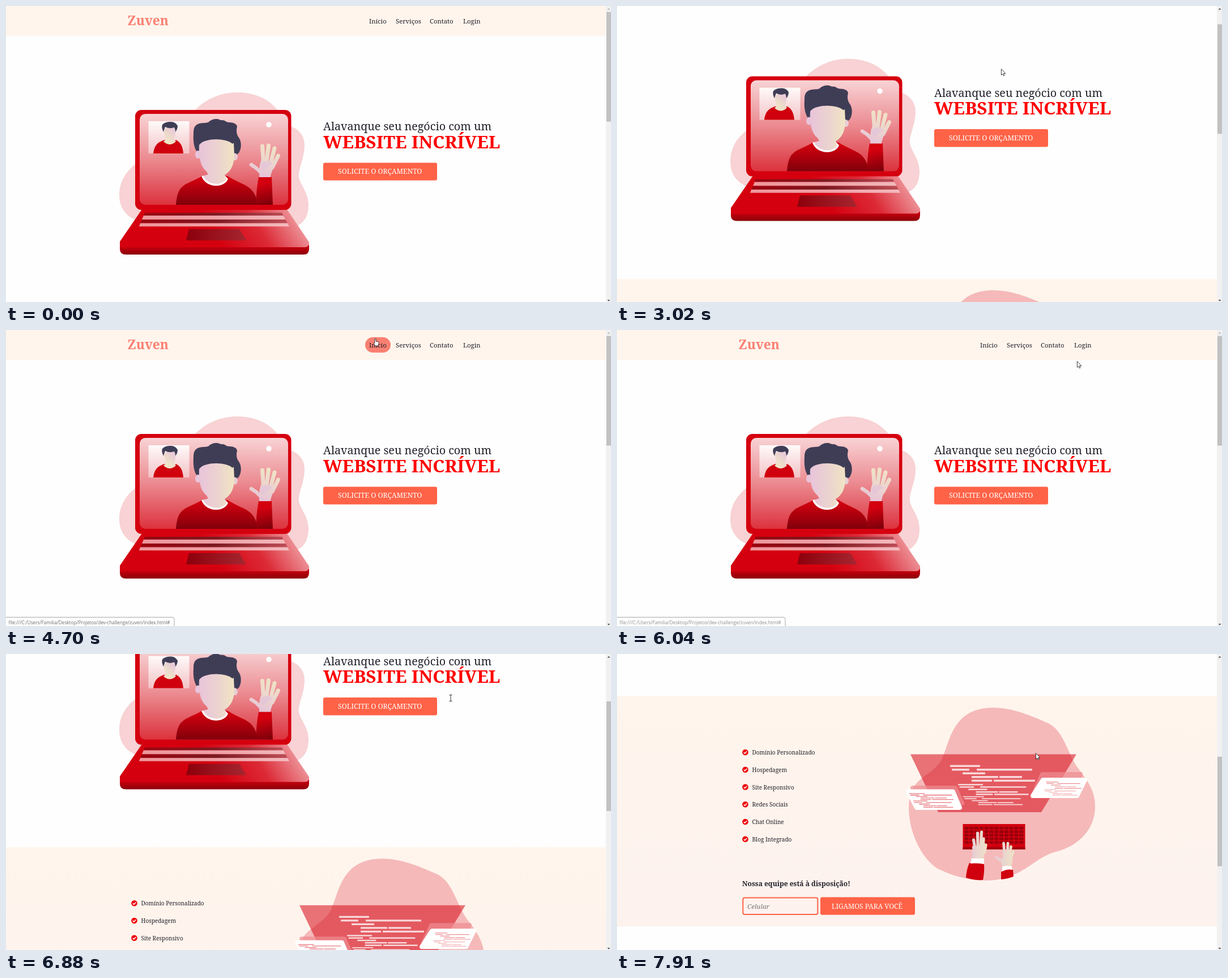
These frames come from a looping animation (1068x524 px, 8000 ms). An HTML page:

```html
<!DOCTYPE html>
<html lang="pt-BR">
<head>
<meta charset="utf-8">
<title>Landing page</title>
<style>
html, body { margin: 0; width: 100%; height: 100%; overflow: hidden; background: #fefefe; }
svg { display: block; width: 100%; height: 100%; }
text { font-family: "Noto Serif", serif; fill: #20202a; white-space: pre; }
.b { font-weight: 700; }
.w { fill: #fff; }
#status text { font-family: "Open Sans", sans-serif; }
</style>
</head>
<body>
<svg id="stage" viewBox="0 0 1068 524" xmlns="http://www.w3.org/2000/svg"></svg>
<script>
const LOOP = 8000, STEP = 50;
const stage = document.getElementById('stage');
const $ = id => document.getElementById(id);

// ---- drawing helpers ----
const path = (d, fill, more = '') => `<path d="${d}" fill="${fill}" ${more}/>`;
const rect = (x, y, w, h, fill, rx = 0, more = '') =>
  `<rect x="${x}" y="${y}" width="${w}" height="${h}" fill="${fill}" rx="${rx}" ${more}/>`;
const text = (x, y, size, str, more = '') =>
  `<text x="${x}" y="${y}" font-size="${size}" ${more}>${str}</text>`;
const grad = (id, x1, y1, x2, y2, ...stops) =>
  `<linearGradient id="${id}" gradientUnits="userSpaceOnUse" x1="${x1}" y1="${y1}" x2="${x2}" y2="${y2}">` +
  stops.map((c, i) => `<stop offset="${i / (stops.length - 1)}" stop-color="${c}"/>`).join('') +
  '</linearGradient>';
const fingers = (d, paint, w) =>
  path(d, 'none', `stroke="${paint}" stroke-width="${w}" stroke-linecap="round" stroke-linejoin="round"`);

const defs = '<defs>' +
  grad('screen', 0, 191, 0, 352, '#f8d3d5', '#eb8a90', '#dc323d') +
  grad('thumbBg', 0, 204, 0, 261, '#fffafa', '#f3c3c6') +
  grad('skin', 341, 0, 403, 0, '#e8c4da', '#ebd2d0', '#f0e4c4') +
  grad('miniSkin', 282, 238, 296, 222, '#efe4c6', '#ecd9cb', '#e9cbd6') +
  grad('shirt', 0, 305, 0, 352, '#d4000f', '#80000a') +
  grad('sleeve', 452, 315, 460, 352, '#d4000f', '#7c000a') +
  grad('wave', 470, 245, 452, 303, '#f0e4c4', '#ecd6cd', '#e6c4d8') +
  grad('deck', 390, 440, 512, 362, '#d5000f', '#dc2a36', '#efa0a5') +
  grad('front', 0, 427, 0, 440, '#c2000d', '#8a0009') +
  grad('dark', 240, 0, 500, 0, '#9a0510', '#7c1a22', '#c05059') +
  grad('light', 240, 0, 500, 0, '#ee979c', '#ee9fa4', '#f3bbbe') +
  grad('pad', 318, 0, 424, 0, '#8c000b', '#a52630') +
  grad('cream', 0, 75, 0, 482, '#fff5ec', '#fdf2ee') +
  grad('typeL', 624, 0, 654, 0, '#e6cbd6', '#efe3c6') +
  grad('typeR', 668, 0, 703, 0, '#e6cbd6', '#efe3c6') +
  '</defs>';

// ---- hero ----
const NAV = [['Início', 641, 31], ['Serviços', 688, 44], ['Contato', 748, 42], ['Login', 807, 30]];

const header = rect(0, 0, 1059, 53, '#fff5ed') +
  text(214.5, 34, 22.8, 'Zuven', 'class="b" style="fill:#fa8072"') +
  rect(634, 12.7, 45, 27.4, '#fa8072', 13.7, 'id="pill"') +
  NAV.map(([s, x]) => text(x, 31, 11.3, s)).join('');

function keyRow(y, h, fill) {
  const l = v => 245 - (v - 366) * .42, r = v => 487 + (v - 366) * .54;
  return path(`M${l(y)} ${y}H${r(y)}L${r(y + h)} ${y + h}H${l(y + h)}Z`, fill);
}

const laptop =
  path('M333 185C355 162 382 153 409 153C440 153 465 165 481 186L503 213C520 220 527 232 527 247C527 270 515 290 517 303C520 318 534 330 534 352C534 370 527 384 514 389L232 380C210 372 200 355 200 335C200 308 214 292 228 280Z', '#f8d2d4') +
  path('M240 360H496L535 418V428H201V417Z', 'url(#deck)') +
  path('M201 427H527Q533 427 535 422V430Q535 440 525 440H212Q201 440 201 430Z', 'url(#front)') +
  keyRow(366, 5, 'url(#dark)') + keyRow(371, 7, 'url(#light)') +
  keyRow(378, 6.5, 'url(#dark)') + keyRow(384.5, 5.7, 'url(#light)') +
  path('M323 395H412L424 415H318Z', 'url(#pad)') +
  rect(228, 184, 275.5, 177, '#d5000f', 11) +
  rect(236, 191, 262, 161, 'url(#screen)', 10) +
  '<circle cx="464" cy="210" r="4.8" fill="#fff"/>';

const mini = rect(251.5, 204, 72, 57, 'url(#thumbBg)') +
  path('M260 261C262 246 268 241 280 237Q290 250 300 237C308 241 312 248 313 261Z', '#d0000e') +
  path('M279 216H299Q300 230 296 236L300 240Q289 250 278 240L283 236Q278 228 279 216Z', 'url(#miniSkin)') +
  path('M278 223Q274 215 276 210Q281 205 290 205Q298 204 303 212Q303 218 299 223Q299 218 297 215Q288 218 281 214Q279 218 278 223Z', '#3f3d56');

const person =
  path('M300 352C302 330 306 322 318 315C330 309 338 306 346 301H391C410 313 425 316 433 325C440 333 443 340 444 352Z', 'url(#shirt)') +
  path('M345 301C352 323 386 323 392 306L386 300H352Z', '#fff') +
  path('M337 258C332 250 330 240 331 226C331 218 332 213 337 210C343 206 350 208 357 206C362 201 367 200 372 200C376 200 378 203 382 202C387 202 388 206 394 206C402 206 408 209 408 214C406 220 407 228 411 233C416 240 416 252 411 260L404 266L341 264Z', '#3f3d56') +
  '<ellipse cx="339" cy="263" rx="5" ry="7" fill="#e8c4da"/><ellipse cx="404" cy="267" rx="5" ry="6.5" fill="#e9cdd3"/>' +
  path('M341 246C350 233 388 233 400 244L402 242L403 262C403 280 398 292 386 299L387 303L389 306C383 318 357 319 348 301L357 298L354 293C343 284 340 268 341 246Z', 'url(#skin)') +
  path('M446 303Q457 301 469 303L471 352H441.500Q441 330 446 303Z', 'url(#sleeve)') +
  fingers('M452.500 248L454.500 276M463.500 247L460 276M474 252L467 279M480.500 265L470 286', 'url(#wave)', 7) +
  fingers('M433 281L442 287L452 297', 'url(#wave)', 6.5) +
  path('M447 303C448 291 446 281 451 273L470 276C476 284 468 292 467 303Z', 'url(#wave)') +
  path('M449 279Q460 270 471 279Q461 285 454 292Q449 287 449 279Z', '#e3c3da', 'opacity=".7"');

const hero = laptop + mini + person +
  text(560, 220, 19.7, 'Alavanque seu negócio com um') +
  text(560, 251.5, 31.5, 'WEBSITE INCRÍVEL', 'class="b" style="fill:red"') +
  rect(560, 277.5, 201, 31.3, '#ff6347', 3) +
  text(586, 297.4, 12.25, 'SOLICITE O ORÇAMENTO', 'class="w"');

// ---- services section ----
// Five rows of code bars: pairs of offset and length
const CODE = [[0, 53], [3, 31, 47, 98], [22, 40], [38, 47, 87, 40], [38, 36, 77, 73]];
function code(x, y, k, dy, h, fill) {
  let s = '';
  CODE.forEach((row, i) => {
    for (let j = 0; j < row.length; j += 2)
      s += rect(x + row[j] * k, y + i * dy, row[j + 1] * k, h, fill, h / 4);
  });
  return s;
}
const card = (d, fill, more = '') =>
  path(d, fill, `stroke="${fill}" stroke-width="8" stroke-linejoin="round" ${more}`);

let keys = '';
for (let r = 0; r < 5; r++)
  for (let c = 0; c < 12; c++) keys += rect(613.5 + c * 8.8, 306 + r * 6.3, 7, 4.6, '#98000c', .8);

const ITEMS = ['Domínio Personalizado', 'Hospedagem', 'Site Responsivo', 'Redes Sociais', 'Chat Online', 'Blog Integrado'];
const list = ITEMS.map((s, i) => {
  const y = 174 + i * 30.75;
  return `<circle cx="226.500" cy="${y}" r="5.300" fill="#f00008"/>` +
    path(`M223.800 ${y + .2}L225.700 ${y + 2.1}L229.300 ${y - 1.8}`, 'none', 'stroke="#fff" stroke-width="1.500"') +
    text(238.5, y + 4, 10, s);
}).join('');

const desk =
  path('M664 95C700 95 735 111 762 123C790 137 796 180 816 205C834 228 844 245 844 270C844 310 815 340 775 350C735 360 715 400 652 401C620 401 590 392 566 380C535 360 515 312 515 272C515 215 556 220 574 185C588 155 592 95 664 95Z', '#f5b9b9') +
  path('M518 177.500H811L749 280H567Z', '#d91521', 'opacity=".58"') +
  code(588, 196.5, 1, 6.5, 3.4, '#f8d8d9') +
  code(602, 230, .83, 4.3, 2.5, '#f8d8d9') +
  code(611, 251.7, .7, 3.5, 1.9, '#f8d8d9') +
  card('M751 213H818L804 242H738Z', '#ee8d92', 'opacity=".7"') +
  card('M752 223H826L812 251H734Z', '#fff') +
  code(757, 226, .42, 2.8, 1.2, '#ec8d92') + code(754, 239.5, .39, 2.5, 1.1, '#f0a3a7') +
  card('M522 237H597L609 264H540Z', '#ee8d92', 'opacity=".7"') +
  card('M514 243.500H593L605 272H529Z', '#fff') +
  code(516, 246.5, .52, 2.6, 1.3, '#e8777e') + code(523, 259.5, .47, 2.8, 1.3, '#e8777e') +
  rect(610.5, 301, 110, 45, '#d3000f') + rect(610.5, 342, 110, 4, '#a0000c') + keys +
  // left hand
  path('M622 370L648 371Q649 386 646 400Q630 401 616 396Q617 381 622 370Z', '#d0000e') +
  path('M626 361L648 362L648 372Q635 369 624 371Z', '#fff') +
  fingers('M629.500 329L632 345M636.500 317L637 343M643.500 315L642 343M647 327L646 348M651 338L649 350', 'url(#typeL)', 5.2) +
  path('M627 340H650Q652 349 648 356L647 362Q637 361 627 362Q628 350 627 340Z', 'url(#typeL)') +
  // right hand
  path('M678 386Q688 379 699 382L700 394Q690 398 678 399Z', '#d0000e') +
  path('M680 376Q689 374 697 376L698 382Q688 380 680 385Z', '#fff') +
  fingers('M682.500 335L684 354M690 335L689 354M695.500 341L693 356M699.500 350L695 362M669.500 360L681 368', 'url(#typeR)', 4.8) +
  path('M681 352L697 353Q700 364 696 376Q688 374 680 376L677 366Q682 362 681 352Z', 'url(#typeR)');

const services = '<g transform="translate(0 467.600)">' +
  rect(0, 75, 1059, 407.3, 'url(#cream)') + list + desk +
  text(221, 411, 12.05, 'Nossa equipe está à disposição!', 'class="b"') +
  rect(222.3, 431.5, 132, 29.5, 'none', 3, 'stroke="#ff6347" stroke-width="2"') +
  text(230, 451, 11.6, 'Celular', 'font-style="italic" style="fill:#777"') +
  rect(359, 430.5, 167, 31.3, '#ff6347', 3) +
  text(379, 451, 12, 'LIGAMOS PARA VOCÊ', 'class="w"') + '</g>';

// ---- browser chrome ----
const bar = rect(1059, 0, 9, 524, '#f1f1f1') +
  rect(1060, 10.6, 8, 194, '#c1c1c1', 0, 'id="thumb"') +
  path('M1061.500 6.500L1064 3.800L1066.500 6.500Z', '#505050', 'id="up"') +
  path('M1061.500 520L1064 522.700L1066.500 520Z', '#505050');

const status = '<g id="status">' +
  path('M-1 525V508.500H294Q297 508.500 297 511.500V525Z', '#fff', 'stroke="#a8a8a8"') +
  text(4.5, 521.3, 8.22, 'file:///C:/Users/Familia/Desktop/Projetos/dev-challenge/zuven/index.html#', 'id="link"') + '</g>';

const outline = 'stroke="#111" stroke-width=".8" stroke-linejoin="round"';
const pointer = '<g id="pointer">' +
  path('M.4 .5V11.300L2.800 9.100L4.400 12.600L6 11.900L4.500 8.500H7.800Z', '#fff', `id="arrow" ${outline}`) +
  path('M-1.100 .6Q0 -.8 1.100 .6V5L5.300 6Q6.500 6.500 6.200 8L5.200 13H-.5L-3 8.600Q-2.700 6.900 -1.100 8.300Z', '#fff', `id="hand" ${outline}`) +
  path('M-2.500 -5.500H2.500M0 -5.500V5.500M-2.500 5.500H2.500', 'none', 'id="beam" stroke="#333"') + '</g>';

stage.innerHTML = defs + rect(0, 0, 1068, 524, '#fefefe') +
  `<g id="page">${header}${hero}${services}</g>` + bar + status + pointer;

// ---- motion ----
const MOVES = [[290, 1006, 515], [740, 750, 363], [990, 750, 363], [1190, 669, 341], [1940, 669, 341],
  [1990, 672, 329], [2190, 681, 247], [2400, 681, 247], [2590, 688, 164], [2820, 688, 164],
  [2960, 678, 111], [4250, 678, 111], [4690, 652, 15], [4760, 652, 15], [5060, 712, 24],
  [5400, 770, 26], [5700, 822, 28], [5900, 822, 30], [6040, 812, 55], [6250, 785, 78],
  [6900, 785, 78], [7300, 739, 175]];
const SCROLL = [[2950, 0], [3040, 133.6], [3540, 133.6], [3740, 66.8], [3890, 66.8], [3990, 0],
  [6540, 0], [6840, 200.4], [6950, 200.4], [7500, 400.8], [7740, 400.8], [7890, 467.6]];
const SHAPES = [[0, 'arrow'], [2040, 'hand'], [2140, 'arrow'], [2190, 'beam'], [2540, 'arrow'],
  [3040, 'beam'], [4290, 'arrow'], [4590, 'hand'], [5990, 'arrow'], [6690, 'beam'], [7090, 'arrow']];

function at(keys, t, i = 1) {
  const n = keys.findIndex(k => k[0] > t);
  if (n === 0) return keys[0][i];
  if (n < 0) return keys[keys.length - 1][i];
  const a = keys[n - 1], b = keys[n];
  return a[i] + (b[i] - a[i]) * (t - a[0]) / (b[0] - a[0]);
}
const show = (id, on) => $(id).setAttribute('visibility', on ? 'visible' : 'hidden');

function draw(time) {
  const t = Math.max(0, Math.floor((time - 40) / STEP) * STEP + 40);
  const y0 = at(SCROLL, t), x = at(MOVES, t), y = at(MOVES, t, 2);
  const shape = SHAPES.filter(s => s[0] <= t).pop()[1];

  $('page').setAttribute('transform', `translate(0 ${-y0})`);
  $('thumb').setAttribute('y', 10.6 + y0 * .366);
  $('up').setAttribute('fill', y0 ? '#505050' : '#b5b5b5');

  const seen = t >= 290;
  $('pointer').setAttribute('transform', `translate(${x} ${y})`);
  for (const id of ['arrow', 'hand', 'beam']) show(id, seen && id === shape);

  const hot = y < 41 && NAV.find(([, nx, w]) => x >= nx - 7 && x <= nx + w + 8);
  show('pill', hot);
  if (hot) {
    $('pill').setAttribute('x', hot[1] - 7);
    $('pill').setAttribute('width', hot[2] + 14);
  }

  const fade = Math.min(1, Math.max(0, (6400 - t) / 200));
  show('status', t >= 4590 && fade > 0);
  $('status').setAttribute('opacity', fade);
  $('link').style.fill = t < 5990 ? '#6c6c6c' : '#8c8c8c';
}

const start = performance.now();
function tick() {
  draw((performance.now() - start) % LOOP);
  requestAnimationFrame(tick);
}
tick();
</script>
</body>
</html>
```
